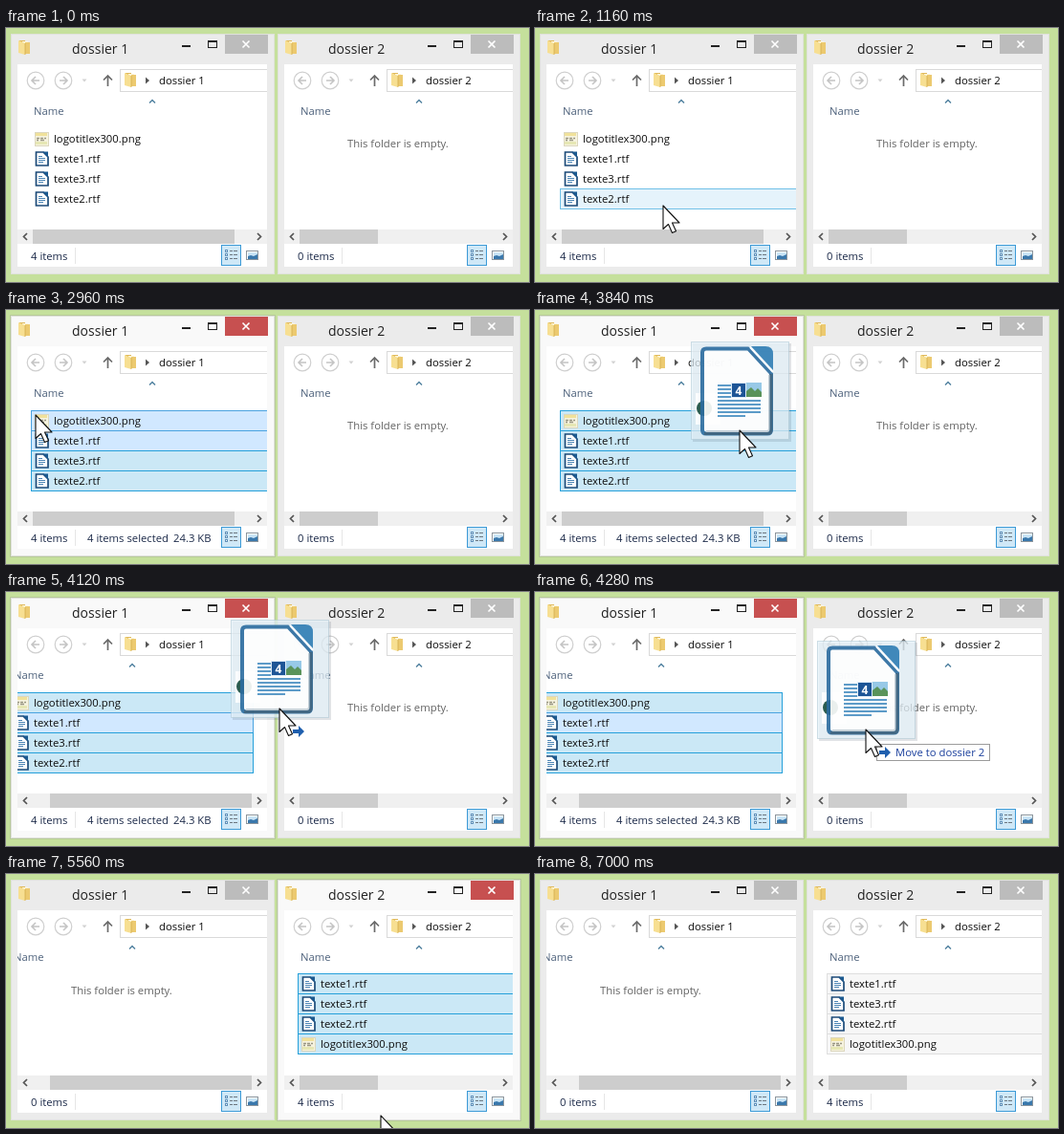
Recreate the animation shown at these times as an HTML page. Size 547 by 266 pixels, loop 7040 ms.

```html
<!DOCTYPE html>
<html lang="en">
<head>
<meta charset="utf-8">
<title>Moving files between folders</title>
<style>
  html, body { margin: 0; width: 100%; height: 100%; overflow: hidden; background: #c5e09c; }
  svg { display: block; }
  text { font: 11.3px "Open Sans", "Noto Sans", sans-serif; fill: #0c0c0c; white-space: pre; }
  .title { font-size: 14px; fill: #222; }
  .head { fill: #4c607a; }
  .empty { fill: #626262; }
  .status { fill: #1b2948; }
  .badge { font-size: 12px; font-weight: 700; fill: #fff; text-anchor: middle; }
  .tip { fill: #1a3f9c; }
  rect { shape-rendering: crispEdges; }
</style>
</head>
<body>
<svg id="stage" width="547" height="266" viewBox="0 0 547 266"></svg>
<script>
const LOOP = 7040, STEP = 40, ROW = 21;
const stage = document.getElementById('stage');

function el(tag, attrs, parent, text) {
  const node = document.createElementNS('http://www.w3.org/2000/svg', tag);
  for (const k in attrs) node.setAttribute(k, attrs[k]);
  if (text !== undefined) node.textContent = text;
  parent.appendChild(node);
  return node;
}
const rect = (p, x, y, width, height, fill, more) => el('rect', { x, y, width, height, fill, ...more }, p);
const line = (p, d, stroke, width = 1, more) =>
  el('path', { d, stroke, 'stroke-width': width, fill: 'none', ...more }, p);
const shape = (p, d, fill, more) => el('path', { d, fill, ...more }, p);
const label = (p, x, y, text, cls = '') => el('text', { x, y, class: cls }, p, text);
const group = (p, x = 0, y = 0) => el('g', { transform: `translate(${x} ${y})` }, p);
const move = (node, x, y) => node.setAttribute('transform', `translate(${x} ${y})`);
const show = (node, on) => node.setAttribute('visibility', on ? 'visible' : 'hidden');
const set = (node, attrs) => { for (const k in attrs) node.setAttribute(k, attrs[k]); };

function folder(p, x, y) {
  const g = group(p, x, y);
  shape(g, 'M1 1h6v13H1z', '#e0b95a');
  shape(g, 'M4 2h6v11H4z', '#fdf6dc');
  shape(g, 'M7 3h5v12H7z', '#ecca70');
  shape(g, 'M0 1l7 3v12l-7-2z', '#f7df92');
  line(g, 'M7 4v12', '#d3ab4c', .8);
}

function docIcon(p, x, y) {
  const g = group(p, x, y);
  shape(g, 'M1.500 1h7.500l5 5v9h-12.500z', '#fff', { stroke: '#1c4a78', 'stroke-width': 1.7 });
  shape(g, 'M8.500 .500h5.500v6z', '#1c5a90');
  line(g, 'M4 5.500h4M4 7.500h7M4 9.500h7M4 11.500h5', '#4a84b4');
}

function imageIcon(p, x, y) {
  const g = group(p, x, y);
  rect(g, 0, 1, 14, 14, '#f6f3df', { stroke: '#dcd7bd' });
  rect(g, 1, 2, 12, 3, '#f0e19a');
  line(g, 'M2 7.500h3M6 7.500h3M10 7.500h2M2 9.500h2M6 9.500h4', '#9a9784', 1.3);
  rect(g, 1, 11, 12, 3, '#e6e7b4');
}

function fileRow(p, name, y) {
  const g = group(p, 0, y);
  const back = rect(g, 26.5, .5, 253, ROW, 'none');
  (name.endsWith('.png') ? imageIcon : docIcon)(g, 30, 3);
  label(g, 50, 15, name);
  return { g, back };
}

const LOOKS = {
  none: { fill: 'none', stroke: 'none' },
  ring: { fill: '#fff', stroke: '#26a0da' },
  hot: { fill: '#e5f3fb', stroke: '#70c0e7' },
  sel: { fill: '#cbe8f6', stroke: '#26a0da' },
  selHot: { fill: '#d1e8ff', stroke: '#4aa3e0' },
  idle: { fill: '#f7f7f7', stroke: '#dedede' }
};

function makeWindow(o) {
  const g = group(stage, o.x), right = o.right, edge = right - 7;
  const halo = rect(g, 4.5, 5.5, right - 3, 253, 'none', { stroke: '#b7c99a' });
  const frame = rect(g, 5.5, 6.5, right - 5, 251, '#ebebeb', { stroke: '#e0e2dc' });
  folder(g, 13, 12);
  label(g, o.titleX, 27, o.name, 'title');

  rect(g, right - 96, 18, 9, 2, '#222');
  rect(g, right - 68.5, 13.5, 9, 7, 'none', { stroke: '#222' });
  rect(g, right - 69, 13, 10, 2, '#222');
  const close = rect(g, right - 51, 7, 45, 20, '#bcbcbc');
  line(g, `M${right - 32.5} 13.500l7 7m0 -7l-7 7`, '#fff', 1.6);

  const w = edge - 12;
  const box = el('svg', { x: 12, y: 38, width: w, height: 212, viewBox: `12 38 ${w} 212` }, g);
  rect(box, 12, 38, w, 212, '#fff');

  for (const [cx, dir] of [[31, -1], [60, 1]]) {
    el('circle', { cx, cy: 55, r: 8.8, fill: '#fff', stroke: '#cfcfcf', 'stroke-width': 1.2 }, box);
    line(box, `M${cx - 4 * dir} 55h${8 * dir}m${-4 * dir} -4l${4 * dir} 4l${-4 * dir} 4`, '#c4c4c4', 1.6);
  }
  shape(box, 'M79.500 53.500h5l-2.500 3z', '#d2d2d2');
  line(box, 'M106.500 61v-11m-4.500 4.500l4.500-4.500l4.500 4.500', '#6b6b6b', 1.7);
  rect(box, 119.5, 43.5, 200, 23, '#fff', { stroke: '#d9d9d9' });
  folder(box, 124, 46);
  shape(box, 'M146 51.500v7l4-3.500z', '#555');
  label(box, 160, 59, o.name);

  const list = group(box);
  label(list, 29, 91, 'Name', 'head');
  line(list, 'M150 78.500l3-3l3 3', '#4d7f9e', 1.4);
  const empty = label(list, o.emptyX, o.top + 21, 'This folder is empty.', 'empty');
  const files = group(list);
  const rows = o.files.map((name, i) => fileRow(files, name, o.top + i * ROW));

  rect(box, 12, 211, w, 15, '#f0f0f0');
  const thumb = rect(box, 28, 211, o.thumb, 15, '#cdcdcd');
  line(box, `M22 215l-3.500 3.500l3.500 3.500M${edge - 10} 215l3.500 3.500l-3.500 3.500`, '#555', 1.7);

  rect(box, 12, 226, w, 24, '#fff');
  rect(box, 72, 230, 1, 17, '#e6e6e6');
  const count = label(box, 26, 243, '', 'status');
  const picked = label(box, 85, 243, '', 'status');
  const size = label(box, 170, 243, '', 'status');
  const bx = right - 55;
  rect(box, bx + .5, 227.5, 20, 21, '#cfe8f7', { stroke: '#3c9ad6' });
  for (let i = 0; i < 3; i++) {
    rect(box, bx + 4, 232 + i * 4, 3, 3, '#5e8fb8');
    rect(box, bx + 5, 233 + i * 4, 1, 1, '#fff');
    rect(box, bx + 9, 233 + i * 4, 3, 1, '#6c7780');
    rect(box, bx + 13, 233 + i * 4, 4, 1, '#6c7780');
  }
  rect(box, bx + 26.5, 233.5, 12, 9, '#fff', { stroke: '#8b959d' });
  rect(box, bx + 28, 235, 10, 4, '#c9e4f6');
  shape(box, `M${bx + 28} 242v-3l3-1l3 1l4-2v5z`, '#3a78ac');

  return {
    rows,
    active(on) {
      close.setAttribute('fill', on ? '#c75050' : '#bcbcbc');
      frame.setAttribute('fill', on ? '#f9f9f9' : '#ebebeb');
      show(halo, on);
    },
    filled(on) { show(files, on); show(empty, !on); },
    scroll(dx) {
      move(list, -dx, 0);
      thumb.setAttribute('x', 28 + Math.round(dx * 18 / 21));
    },
    status(a, b = '', c = '', cx = 170) {
      count.textContent = a;
      picked.textContent = b;
      size.textContent = c;
      size.setAttribute('x', cx);
    }
  };
}

const left = makeWindow({
  x: 0, right: 280, name: 'dossier 1', titleX: 69, emptyX: 89, top: 105, thumb: 211,
  files: ['logotitlex300.png', 'texte1.rtf', 'texte3.rtf', 'texte2.rtf']
});
const right = makeWindow({
  x: 279, right: 258, name: 'dossier 2', titleX: 58, emptyX: 78, top: 104, thumb: 82,
  files: ['texte1.rtf', 'texte3.rtf', 'texte2.rtf', 'logotitlex300.png']
});

const band = rect(stage, 0, 0, 0, 0, '#3385d6', { 'fill-opacity': .48, stroke: '#3c8fdc' });

// Dragged thumbnail, placed relative to the pointer tip
const ghost = group(stage);
const card = group(ghost, -51, -93);
rect(card, 2, 2, 103, 103, '#456', { opacity: .16 });
rect(card, .5, .5, 102, 102, '#e6f3fa', { opacity: .72, stroke: '#b9d0dc' });
rect(card, 5, 54, 26, 33, '#fff', { opacity: .85 });
el('circle', { cx: 14, cy: 70, r: 8, fill: '#2b5c50' }, card);
const paper = el('g', { opacity: .9 }, card);
shape(paper, 'M16 7.500h44l24 26v59q0 4-4 4H16q-4 0-4-4V11.500q0-4 4-4z', '#fff',
  { stroke: '#2b6c9f', 'stroke-width': 4, 'stroke-linejoin': 'round' });
line(paper, 'M16 94h64q2 0 2-3V35', '#c3ced6', 2);
line(paper, 'M14 96.500h66q4 0 4-4V34', '#315a78', 3);
line(paper, 'M62 6l24 26', '#fff', 2);
shape(paper, 'M63 5h15q8 0 8 8v17z', '#2f7db4');
for (let i = 0; i < 9; i++) rect(paper, 28, 45 + i * 4, i < 4 ? 28 : i < 8 ? 45 : 29, 2, '#4f93c4');
rect(paper, 58, 43, 16, 15, '#8fc6e6');
shape(paper, 'M58 58v-6l5-4l4 4l3-3l4 4v5z', '#4c8a4a');
rect(card, 42.5, 43.5, 15, 15, '#1d5596', { stroke: '#dcebf7' });
el('text', { x: 50, y: 55.5, class: 'badge' }, card, '4');

const hint = group(ghost, 11, 15);
const hintBox = rect(hint, .5, .5, 118, 17, '#fff', { stroke: '#9b9b9b' });
shape(hint, 'M3 7h6V3l6 6l-6 6v-4H3z', '#1f5fae');
const hintText = label(hint, 20, 13, 'Move to dossier 2', 'tip');

const pointer = shape(stage, 'M0 0V24.500L5.500 19.500L9.500 28.500L13.500 26.800L9.500 18H17Z', '#fff',
  { stroke: '#111', 'stroke-width': 1.1, 'stroke-linejoin': 'round' });

// time, x, y
const PATH = [
  [440, 150, 270], [1000, 134, 186], [1320, 134, 186], [1480, 134, 196], [1800, 134, 195],
  [2080, 93, 162], [2520, 31, 110], [3000, 31, 110], [3480, 140, 160], [3640, 140, 160],
  [3840, 214, 126], [4120, 286, 122], [4360, 376, 155], [5360, 376, 155], [5600, 395, 272]
];

function tipAt(t) {
  if (t <= PATH[0][0]) return PATH[0].slice(1);
  const i = PATH.findIndex(k => k[0] > t);
  if (i < 0) return PATH[PATH.length - 1].slice(1);
  const a = PATH[i - 1], b = PATH[i], f = (t - a[0]) / (b[0] - a[0]);
  return [1, 2].map(n => Math.round(a[n] + (b[n] - a[n]) * f));
}

function leftLook(i, t, y) {
  const top = 105 + i * ROW, over = y >= top && y < top + ROW;
  if (t < 1840) return over ? 'hot' : 'none';
  if (t < 2560 && top + ROW <= y) return i === 1 && t >= 2080 ? 'ring' : 'none';
  if (t < 2520) return 'sel';
  if (t < 3040) return i < 2 ? 'selHot' : 'sel';
  if (t < 3680) return over ? 'selHot' : 'sel';
  return t >= 4000 && i === 1 ? 'selHot' : 'sel';
}

function render(t) {
  const [x, y] = tipAt(t), moved = t >= 4800;
  const dragging = t >= 3680 && t < 4400;
  move(pointer, x, y);
  show(pointer, t >= 480 && t < 5600);

  left.active(t >= 1840 && !moved);
  left.filled(!moved);
  left.scroll(Math.round(21 * Math.min(1, Math.max(0, (t - 3940) / 140))));
  left.rows.forEach((r, i) => set(r.back, LOOKS[leftLook(i, t, y)]));
  if (moved) left.status('0 items');
  else if (t >= 2560) left.status('4 items', '4 items selected', '24.3 KB', 175);
  else if (t >= 1920) left.status('4 items', '1 item selected', '7 bytes');
  else left.status('4 items');

  right.active(moved && t < 7000);
  right.filled(moved);
  right.status(t >= 5040 ? '4 items' : '0 items');
  right.rows.forEach((r, i) => {
    const top = 104 + i * ROW, over = y >= top && y < top + ROW;
    set(r.back, LOOKS[t >= 7000 ? 'idle' : over ? 'selHot' : 'sel']);
  });

  show(band, t >= 1840 && t < 2520);
  set(band, { x: x + .5, y: y + .5, width: Math.max(0, 134 - x), height: Math.max(0, 195 - y) });

  move(ghost, x, y);
  ghost.setAttribute('display', dragging ? 'inline' : 'none');
  show(hint, t >= 4040);
  show(hintBox, t >= 4200);
  show(hintText, t >= 4200);
}

const start = performance.now();
function tick() {
  const t = (performance.now() - start) % LOOP;
  render(Math.floor(t / STEP) * STEP);
  requestAnimationFrame(tick);
}
tick();
</script>
</body>
</html>
```
